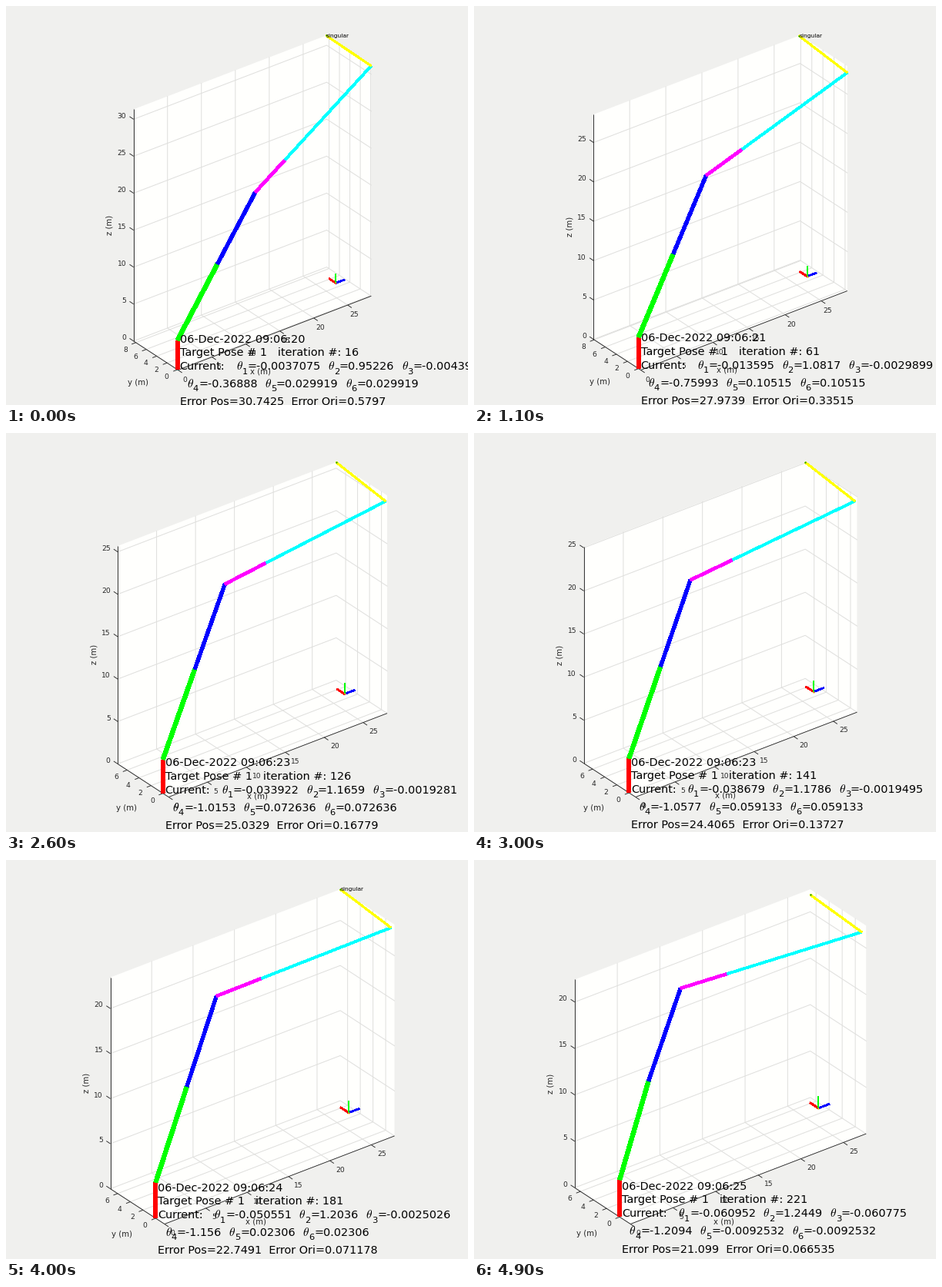
These frames come from a looping animation (600x519 px, 5 s). A matplotlib script:

```python
import numpy as np
import matplotlib.pyplot as plt
from matplotlib.animation import FuncAnimation

plt.rcParams["font.family"] = "DejaVu Sans"
plt.rcParams["mathtext.fontset"] = "cm"

W, H = 600, 519
FRAMES, INTERVAL = 50, 100
INK = (0.15, 0.15, 0.15)
CENTER, BOX_HEIGHT = np.array([320, 255.8]), 435.4

# Frames drawn once more without the "singular" mark before the solver goes on.
REPEATS = (4, 10, 17, 26, 30, 34, 39, 45)

# Solver log at a few steps: theta 1..5, position error, orientation error.
KNOTS = np.array([0, 9, 15, 22, 29, 33, 41])
LOG = np.array([
    [-0.0037075, 0.95226, -0.004395, -0.36888, 0.029919, 30.7425, 0.5797],
    [-0.013595, 1.0817, -0.0029899, -0.75993, 0.10515, 27.9739, 0.33515],
    [-0.022476, 1.1279, -0.0022275, -0.89962, 0.1007, 26.5298, 0.24737],
    [-0.033922, 1.1659, -0.0019281, -1.0153, 0.072636, 25.0329, 0.16779],
    [-0.044801, 1.1925, -0.0020356, -1.1088, 0.040671, 23.5787, 0.10088],
    [-0.050551, 1.2036, -0.0025026, -1.156, 0.02306, 22.7491, 0.071178],
    [-0.060952, 1.2449, -0.060775, -1.2094, -0.0092532, 21.099, 0.066535],
])
RUNAWAY_GAIN = np.array([0, 0.42, -1, 0, 0, 0, 0.8])


def runaway(n):
    """Exponential escape from the singular pose near the end."""
    return 0.0555 * 1.7 ** (np.asarray(n, float) - 41)


BASE = LOG - runaway(KNOTS)[:, None] * RUNAWAY_GAIN
SLOPE = np.gradient(BASE, KNOTS, axis=0, edge_order=2)


def solver_state(n):
    """Cubic Hermite interpolation of the log at step n."""
    k = min(max(np.searchsorted(KNOTS, n, side="right") - 1, 0), len(KNOTS) - 2)
    h = KNOTS[k + 1] - KNOTS[k]
    t = (n - KNOTS[k]) / h
    smooth = ((1 + 2 * t) * (1 - t) ** 2 * BASE[k] + t * (1 - t) ** 2 * h * SLOPE[k]
              + t * t * (3 - 2 * t) * BASE[k + 1] + t * t * (t - 1) * h * SLOPE[k + 1])
    return smooth + runaway(n) * RUNAWAY_GAIN


# Links: colour and width in pixels.
LINKS = [("#ff0000", 6), ("#00ff00", 5.3), ("#0000ff", 4.3),
         ("#ff00ff", 3.5), ("#00ffff", 2.8), ("#ffff00", 2)]
BASE_HEIGHT, TOOL = 4.0, 8.55
ARM_LENGTHS = (10.13, 9.53, 5.24, 15.12)
TARGET = np.array([26.02, 3.5, 0.97])


def arm_joints(th1, th2, th3, th4, th5):
    forward = np.array([np.cos(th1), np.sin(th1), 0])
    side = np.array([-np.sin(th1), np.cos(th1), 0])
    up = np.array([0, 0, 1])
    joints = [np.zeros(3), BASE_HEIGHT * up]
    wrist = th2 + th3 + th4
    for length, pitch in zip(ARM_LENGTHS, (th2, th2 + th3, wrist, wrist)):
        joints.append(joints[-1] + length * (np.cos(pitch) * forward + np.sin(pitch) * up))
    normal = -np.sin(wrist) * forward + np.cos(wrist) * up
    joints.append(joints[-1] + TOOL * (np.cos(th5) * side + np.sin(th5) * normal))
    return np.array(joints)


AZ, EL = np.radians(-37.5), np.radians(30)
VIEW = np.array([
    [np.cos(AZ), np.sin(AZ), 0],
    [np.sin(EL) * np.sin(AZ), -np.sin(EL) * np.cos(AZ), -np.cos(EL)],
])

fig = plt.figure(figsize=(W / 100, H / 100), dpi=100, facecolor="#f0f0ee")
ax = fig.add_axes([0, 0, 1, 1])


def line(a, b, color, width, z, smooth=True):
    ax.plot([a[0], b[0]], [a[1], b[1]], color=color, lw=width * 0.72,
            solid_capstyle="butt", zorder=z, antialiased=smooth)


def label(x, y, s, px, color=INK, ha="center", va="center_baseline", **kw):
    ax.text(x, y, s, fontsize=px * 0.72, color=color, ha=ha, va=va, zorder=6, **kw)


def number(v):
    digits = int(np.floor(np.log10(max(abs(v), 1)))) + 5
    return f"{v:.{digits}g}"


TEXT = 14.4
EM = {".": 0.318, "-": 0.361, "=": 0.838}


def print_line(x, y, s):
    label(x, y, s, TEXT, "black", "left", "baseline")


def print_angles(x, y, first, angles):
    for k, angle in enumerate(angles, first):
        value = "=" + number(angle)
        label(x, y, r"$\theta$", 15.5, "black", "left", "baseline")
        label(x + 7.8, y + 5.5, str(k), 11.5, "black", "left", "baseline")
        print_line(x + 15, y, value)
        x += 15 + TEXT * (sum(EM.get(c, 0.636) for c in value) + 0.636)


def draw_axes(lo, hi, project, scale, step):
    def p(x, y, z):
        return project(np.array([x, y, z]))

    (x0, y0, z0), (x1, y1, z1) = lo, hi
    outline = [p(x0, y1, z0), p(x0, y0, z0), p(x1, y0, z0),
               p(x1, y0, z1), p(x1, y1, z1), p(x0, y1, z1)]
    ax.fill(*np.array(outline).T, color="#fffffd", lw=0, zorder=1)

    def ticks(a, b, gap):
        return range(int(np.ceil(a / gap)) * gap, int(np.floor(b)) + 1, gap)

    def grid(*points):
        ax.plot(*np.array(points).T, color="#dfdfdd", lw=0.72, zorder=2)

    y_dir, x_dir = np.array([-5.2, -3.5]), np.array([-5.5, 2.1])
    for x in ticks(x0, x1, 5):
        grid(p(x, y0, z0), p(x, y1, z0), p(x, y1, z1))
        at = p(x, y0, z0)
        line(at, at - y_dir, INK, 0.9, 3)
        if step < 18:
            label(at[0] + 8.5, at[1] + 12, str(x), 9.2)
        else:
            label(at[0] + 7.5, at[1] + 11, str(x), 9.2, ha="left")
    for y in ticks(y0, y1, 2):
        grid(p(x0, y, z0), p(x1, y, z0), p(x1, y, z1))
        at = p(x0, y, z0)
        line(at, at + x_dir, INK, 0.9, 3)
        label(at[0] - 11, at[1] + 8.5, str(y), 9.2, ha="right")
    for z in ticks(z0, z1, 5):
        grid(p(x0, y1, z), p(x1, y1, z), p(x1, y0, z))
        at = p(x0, y1, z)
        line(at, at + y_dir, INK, 0.9, 3)
        label(at[0] - 9.5, at[1] - 5.2, str(z), 9.2, ha="right")

    left, front, right, top = outline[0], outline[1], outline[2], outline[5]
    for a, b in ((front, right), (front, left), (left, top)):
        line(a, b, INK, 0.9, 3)
    grow = scale - 11.12
    label(330 - 2.1 * grow, 474 - 1.7 * grow, "x (m)", 10.1)
    mid = (left + front) / 2
    label(mid[0] - 23 + grow, mid[1] + 34 + 0.5 * grow, "y (m)", 10.1)
    label(left[0] - 31, (left[1] + top[1]) / 2 - 0.5, "z (m)", 10.1,
          va="center", rotation=90)


def draw(i):
    ax.clear()
    ax.set(xlim=(0, W), ylim=(H, 0))
    ax.axis("off")

    step = i - sum(r <= i for r in REPEATS)
    *angles, err_pos, err_ori = solver_state(step)
    joints = arm_joints(*angles)

    # Tight limits, scaled so that the projected box always has the same height.
    lo, hi = joints.min(axis=0), joints.max(axis=0)
    scale = BOX_HEIGHT / (np.abs(VIEW[1]) @ (hi - lo))
    middle = (lo + hi) / 2

    def project(point):
        return CENTER + scale * (VIEW @ (point - middle))

    draw_axes(lo, hi, project, scale, step)

    origin = project(TARGET)
    for axis, color in enumerate(("#0000ff", "#ff0000", "#00ff00")):
        end = project(TARGET + 1.3 * np.eye(3)[axis])
        line(origin, end, color, 1.8, 4, smooth=False)
    ax.plot(*origin, "o", ms=1.6, mew=0, color="#ffb000", zorder=4)

    pixels = [project(j) for j in joints]
    for (color, width), a, b in zip(LINKS, pixels, pixels[1:]):
        line(a, b, color, width, 5, smooth=False)
    tip = pixels[-1]
    ax.plot(*tip, "o", ms=1.6, mew=0, color="#109010", zorder=5)
    if i not in REPEATS and abs(angles[2]) < 0.03:
        label(tip[0] + 0.3, tip[1] + 2.2, "singular", 7.5, "black", "left", "baseline")

    x, y = pixels[0] + (2.9, 0)
    second = 20 + int(0.3 + 0.125 * step)
    print_line(x, y - 35.3, f"06-Dec-2022 09:06:{second}")
    print_line(x, y - 18, f"Target Pose # 1   iteration #: {16 + 5 * step}")
    print_line(x, y, "Current:")
    print_angles(x + 73, y, 1, angles[:3])
    print_angles(x + 9.4, y + 22.9, 4, [angles[3], angles[4], angles[4]])
    print_line(x, y + 46.3, f"Error Pos={number(err_pos)}  Error Ori={number(err_ori)}")
    return []


anim = FuncAnimation(fig, draw, frames=FRAMES, interval=INTERVAL,
                     repeat=True, repeat_delay=0, blit=False)
plt.show()
```
